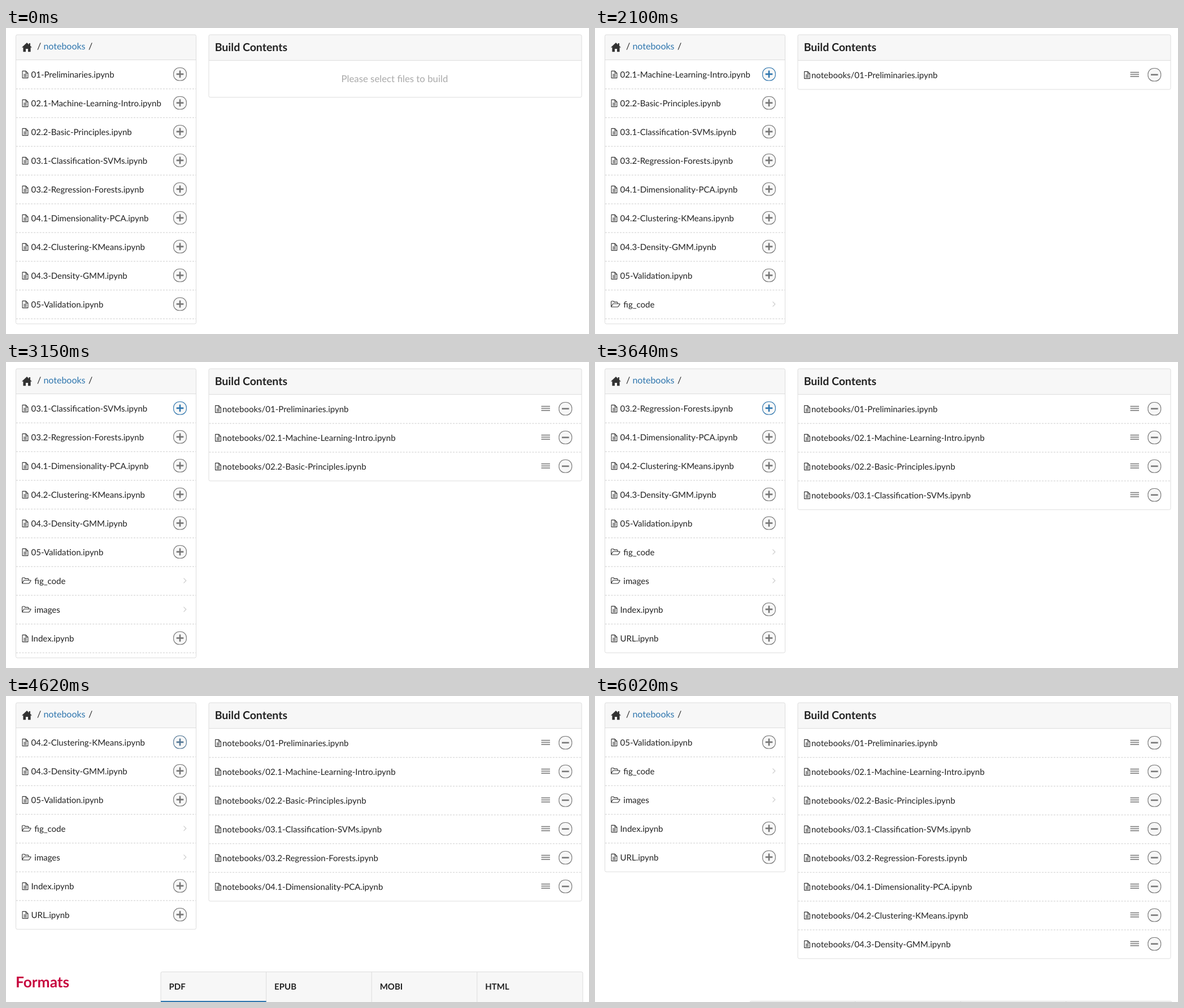
Animation, 1032 px wide and 543 px high, one loop 6.65 s. Source, as an HTML page:

```html
<!DOCTYPE html>
<html lang="en">
<head>
<meta charset="utf-8">
<title>Build Contents</title>
<style>
html, body { margin: 0; width: 100%; height: 100%; overflow: hidden; background: #fff; }
svg { display: block; width: 1032px; height: 543px; font-family: Lato, sans-serif; }
text { fill: #222; white-space: pre; text-rendering: geometricPrecision; }
.row { font-size: 15px; }
.bold { font-weight: 700; }
.line { stroke: #ddd; fill: none; }
.dash { stroke: #ccc; stroke-dasharray: 3 2.2; fill: none; }
.icon { stroke: #333; stroke-width: 1.1; fill: none; stroke-linejoin: round; }
</style>
</head>
<body>
<svg id="stage" viewBox="0 0 1032 543"></svg>
<script>
const LOOP = 6650, ROW = 51, BLUE = '#2f76ae', GREY = '#777';
const files = ['01-Preliminaries', '02.1-Machine-Learning-Intro', '02.2-Basic-Principles',
  '03.1-Classification-SVMs', '03.2-Regression-Forests', '04.1-Dimensionality-PCA',
  '04.2-Clustering-KMeans', '04.3-Density-GMM', '05-Validation',
  'fig_code/', 'images/', 'Index', 'URL'].map(n => n.endsWith('/') ? n : n + '.ipynb');

// Each click moves the top file; the fresh top button turns blue a moment later.
const clicks = [[1960, 2100], [2590, 2660], [3010, 3150], [3500, 3640],
  [4060, 4130], [4550, 4690], [5110, 5180], [5600, 5670]];
const slow = [3, 6]; // clicks after which the button fades through a middle tone

const stage = document.getElementById('stage');

const text = (x, y, s, size, cls = '', fill = '#222') =>
  `<text x="${x}" y="${y}" class="${cls}" style="fill:${fill}${size ? `;font-size:${size}px` : ''}">${s}</text>`;
const path = (d, attrs) => `<path d="${d}" ${attrs}/>`;
const at = (x, y, body) => `<g transform="translate(${x} ${y})">${body}</g>`;

const fileIcon = (x, y) => at(x, y, path('M.6 -5.6H6.6L10.4 -1.8V6.6H.6ZM6.6 -5.6V-1.8H10.4M2.8 .2H8.2M2.8 2.2H8.2M2.8 4.2H8.2', 'class="icon"'));
const folderIcon = (x, y) => at(x, y, path('M.6 4V-4.2Q.6 -5.2 1.6 -5.2H4.6Q5.6 -5.2 5.6 -4.2V-3.6H11Q12 -3.6 12 -2.6V-.8M.8 4.4L3.6 -.2Q4 -.8 4.8 -.8H15.2Q16.6 -.8 15.8 .4L13.4 4.2Q12.8 5 12 5H1.4Q.3 5 .8 4.4', 'class="icon"'));
const chevron = (x, y) => path(`M${x} ${y - 4.3}L${x + 4.3} ${y}L${x} ${y + 4.3}`, 'fill="none" stroke="#ccc" stroke-width="1.2"');
const grip = (x, y) => [-3.7, 0, 3.7].map(d => path(`M${x} ${y + d}h15.5`, 'stroke="#888" stroke-width="1.8"')).join('');

function button(x, y, color, plus) {
  const d = 'M-6.3 0H6.3' + (plus ? 'M0 -6.3V6.3' : '');
  return at(x, y, '<rect x="-11.4" y="-11.4" width="22.8" height="22.8" rx="10.4" ' +
    `fill="#f7f7f7" stroke="${color}" stroke-width="1.1"/>` + path(d, `stroke="${color}" stroke-width="2.6"`));
}

function panel(x, w, head, bottom) {
  return `<rect x="${x}" y="12" width="${w}" height="${bottom - 12}" rx="2.5" fill="#fff"/>` +
    path(`M${x} ${head}V14.5q0 -2.5 2.5 -2.5H${x + w - 2.5}q2.5 0 2.5 2.5V${head}Z`, 'fill="#f7f7f7"') +
    path(`M${x} ${head}h${w}`, 'class="line"') +
    `<rect x="${x}" y="12" width="${w}" height="${bottom - 12}" rx="2.5" class="line"/>`;
}

const dash = (x, w, y) => path(`M${x} ${y}h${w}`, 'class="dash"');

function leftPanel(count, color, bottom) {
  const rows = files.slice(count);
  let out = panel(17.5, 319, 56.5, bottom) +
    path('M28 34.6L37 26L40.6 29.4V27H43V31.7L46 34.6H43.6V42.3H39V37H35V42.3H30.4V34.6Z', 'fill="#333"') +
    text(55, 38.2, '/', 16) + text(66.4, 38.2, 'notebooks', 16, '', BLUE) + text(146, 38.2, '/', 16);
  rows.slice(0, 9).forEach((name, i) => {
    const y = 82 + i * ROW, line = 108 + i * ROW;
    if (name.endsWith('/')) {
      out += folderIcon(28, y) + text(50.3, y + 5.5, name.slice(0, -1), 0, 'row') + chevron(314.5, y);
    } else {
      out += fileIcon(28.5, y) + text(44.5, y + 5.5, name, 0, 'row') +
        button(308, y - .1, i ? GREY : color, true);
    }
    if (line < bottom - 2) out += dash(18, 318, line);
  });
  return out;
}

function rightPanel(count, linkColor, bottom) {
  let out = panel(359, 660, 57.5, bottom) + text(369.7, 41.3, 'Build Contents', 19.5, 'bold');
  if (!count) return out + text(593.5, 96, 'Please select files to build', 16.8, '', '#aaa');
  for (let i = 0; i < count; i++) {
    const y = 83 + i * ROW;
    out += fileIcon(370, y) +
      text(383, y + 5.5, 'notebooks/' + files[i], 0, 'row', i ? '#222' : linkColor) +
      grip(947.5, y - .6) + button(990.3, y - .1, GREY, false);
    if (i < count - 1) out += dash(359.5, 659, 109 + i * ROW);
  }
  return out;
}

function formats(y) {
  if (y > 543) return '';
  const w = 186.6;
  let out = text(17, y + 27.5, 'Formats', 26.3, 'bold', '#c7063f') +
    `<rect x="274" y="${y}" width="747" height="80" rx="2.5" fill="#f7f7f7" stroke="#ddd"/>`;
  ['PDF', 'EPUB', 'MOBI', 'HTML'].forEach((name, i) => {
    if (i) out += path(`M${274 + i * w} ${y}v80`, 'class="line"');
    out += text(288.5 + i * w, y + 31.3, name, 15, 'bold');
  });
  return out + path(`M274 ${y + 52.5}h${w}`, `stroke="${BLUE}" stroke-width="2"`);
}

function buttonColor(t, count) {
  if (!count) return t >= 1890 ? BLUE : GREY;
  if (t >= 5880) return GREY;
  const [start, hover] = clicks[count - 1];
  if (t >= hover) return BLUE;
  return slow.includes(count) && t >= start + 70 ? '#557997' : GREY;
}

let shown = '';
function render(t) {
  const count = clicks.filter(c => t >= c[0]).length;
  const color = buttonColor(t, count);
  const link = t >= 5950 && t < 6020 ? BLUE : '#222';
  const key = [count, color, link].join();
  if (key === shown) return;
  shown = key;
  const left = Math.min(525, 57 + (files.length - count) * ROW);
  const right = count ? 58 + count * ROW : 123;
  stage.innerHTML = leftPanel(count, color, left) + rightPanel(count, link, right) +
    formats(Math.max(left, right) + 75.5);
}

const begin = performance.now();
function tick(now) {
  render(Math.max(0, now - begin) % LOOP);
  requestAnimationFrame(tick);
}
render(0);
requestAnimationFrame(tick);
</script>
</body>
</html>
```
